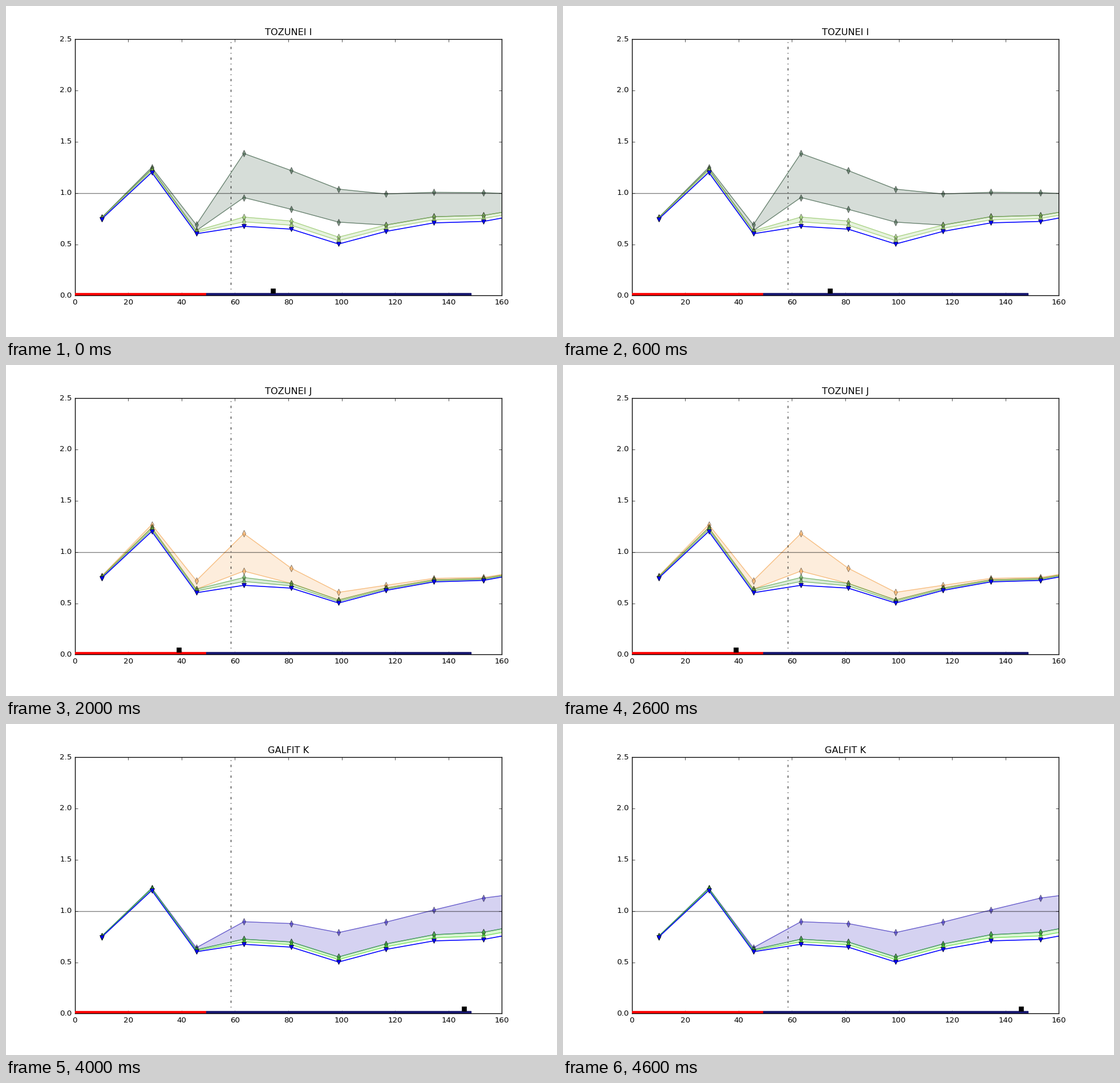
A matplotlib script that plays this animation: 966x580 px, repeating every 5 s.

```python
import numpy as np
import matplotlib.pyplot as plt
from matplotlib.animation import FuncAnimation
from matplotlib.patches import Polygon, Rectangle

plt.style.use("classic")
plt.rcParams.update({
    "font.family": "DejaVu Sans",
    "font.size": 10,
    "figure.facecolor": "white",
    "savefig.dpi": "figure",
    "toolbar": "None",
})

WIDTH, HEIGHT, DPI = 966, 580, 96.6
BREAK = 58.5  # radius of the dash-dotted line
RATIO = 0.69  # lower edge of the outer band relative to its upper edge

radius = np.array([10, 28.8, 45.5, 63.3, 81.05, 98.8, 116.5, 134.5, 153.1, 160])
base = np.array([.745, 1.201, .603, .6755, .648, .503, .6255, .709, .723, .756])
excess = np.array([.015, .049, .087, .71, .571, .535, .365, .298, .281, .24])
marked = list(range(len(radius) - 1))

# title, square position, gain inside the break, gain and growth rate outside,
# outer colour, inner colour
MODELS = [
    ("TOZUNEI I", 74.3, 1.0, 0.90, 0.0, (50, 85, 60), (139, 195, 90)),
    ("TOZUNEI V", 78.4, 0.82, 0.82, 0.002, (130, 100, 150), (90, 30, 95)),
    ("TOZUNEI J", 38.95, 1.35, 0.61, -0.0525, (245, 165, 80), (80, 160, 65)),
    ("SPITZER 3.6", 80.7, 0.82, 0.78, 0.0029, (230, 130, 170), (215, 40, 85)),
    ("GALFIT K", 145.9, 0.45, 0.21, 0.0206, (45, 30, 185), (70, 215, 35)),
]


def curves(core, gain, rate):
    """Upper edges of the outer and the inner band."""
    disk = 0.1 + gain * np.exp(rate * (radius - radius[3]))
    extra = excess * np.where(radius < BREAK, core, disk)
    return base + extra, base + 0.13 * np.sqrt(base * extra)


# the small margin keeps the pixel size from rounding down
fig = plt.figure(figsize=((WIDTH + 0.01) / DPI, (HEIGHT + 0.01) / DPI), dpi=DPI)
ax = fig.add_axes([0.125, 0.125, 0.775, 0.775])
ax.set_xlim(0, 160)
ax.set_ylim(0, 2.5)
ax.set_xticks(range(0, 161, 20))
ax.set_yticks(np.arange(0, 2.6, 0.5))
title = ax.set_title("")


class Band:
    """Shaded strip between two marked curves."""

    def __init__(self, z):
        self.fill = ax.add_patch(
            Polygon([(0, 0), (1, 0), (1, 1)], alpha=0.2, lw=1, zorder=1))
        self.edges = [
            ax.plot(radius, base, "d-", ms=6, lw=1, alpha=0.6,
                    markevery=marked, zorder=z)[0]
            for _ in range(2)
        ]

    def update(self, top, bottom, rgb):
        color = np.array(rgb) / 255
        self.fill.set_xy(np.column_stack([
            np.append(radius, radius[::-1]), np.append(top, bottom[::-1])]))
        self.fill.set_color(color)
        for line, y in zip(self.edges, (top, bottom)):
            line.set_ydata(y)
            line.set_color(color)
            line.set_markerfacecolor(color)
            line.set_markeredgecolor("black")


outer, inner = Band(2.0), Band(2.1)
ax.plot(radius, base, "v-", color="blue", ms=6, lw=1.2,
        markeredgecolor="black", markevery=marked, zorder=2.2)
ax.axhline(1, color="black", alpha=0.5, lw=1, zorder=2.15)
ax.axvline(BREAK, color="black", alpha=0.8, lw=1, ls="-.", zorder=2.15)
for x0, x1, color in ((0, 49.3, "red"), (49.3, 148.4, "midnightblue")):
    ax.add_patch(Rectangle((x0, 0), x1 - x0, 0.025, color=color, lw=1,
                           zorder=2.6))
square, = ax.plot([0], [0.05], "s", color="black", ms=6, zorder=2.7)


def draw(i):
    name, x, core, gain, rate, rgb_out, rgb_in = MODELS[i]
    top, mid = curves(core, gain, rate)
    title.set_text(name)
    square.set_xdata([x])
    outer.update(top, np.maximum(RATIO * top, mid), rgb_out)
    inner.update(mid, np.sqrt(mid * base), rgb_in)
    return []


anim = FuncAnimation(fig, draw, frames=len(MODELS), interval=1000,
                     init_func=lambda: draw(0), repeat=True, repeat_delay=0)
plt.show()
```
